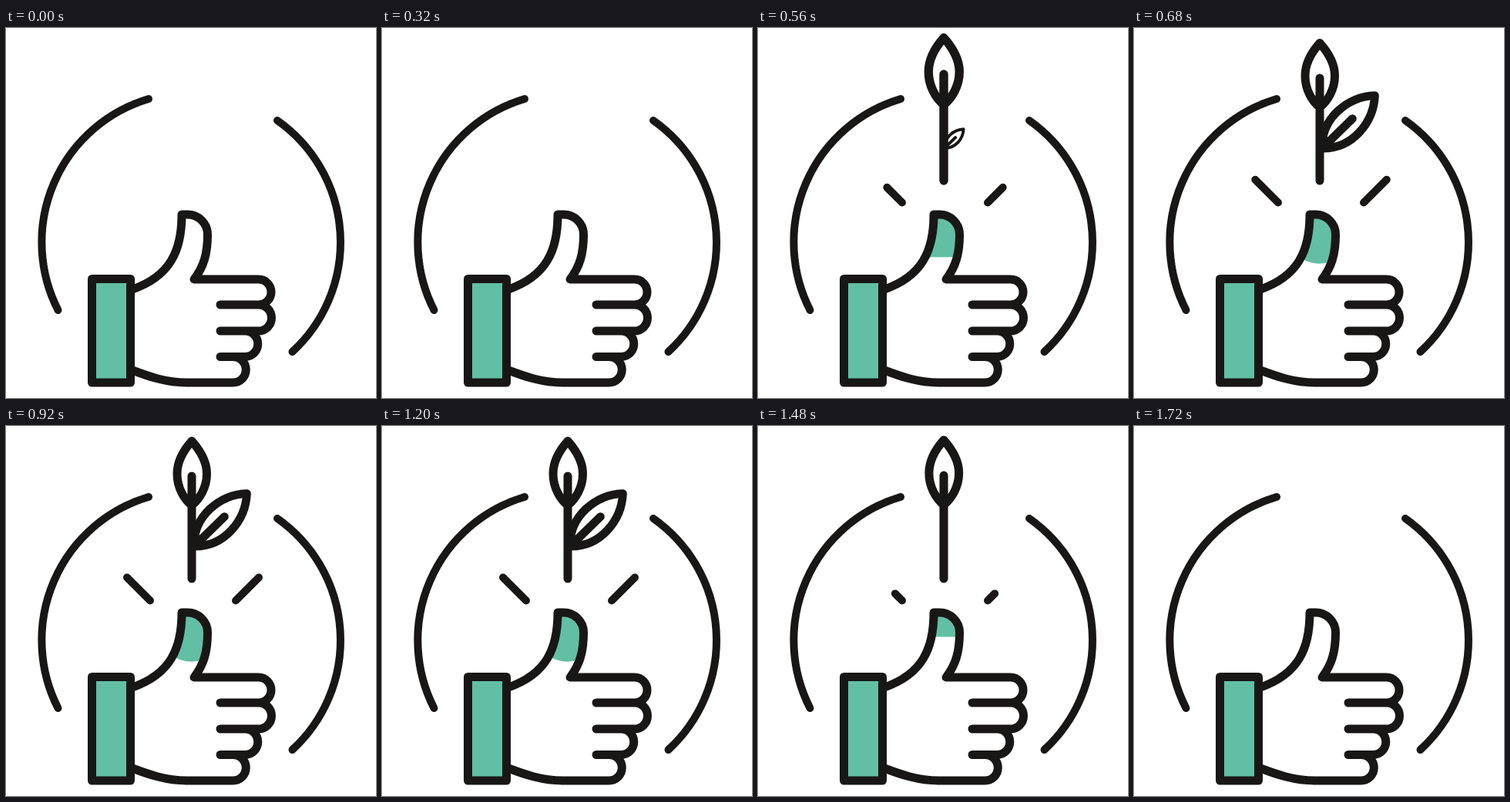
Write an HTML page that moves like this. It is 480 px wide and 480 px high and loops after 2 s.

```html
<!DOCTYPE html>
<html lang="en">
<head>
<meta charset="utf-8">
<title>Green thumb</title>
<style>
  html, body { margin: 0; width: 100%; height: 100%; overflow: hidden; background: #fff; }
  svg { display: block; width: 100%; height: 100%; }
  .ink { fill: none; stroke: #181716; stroke-width: 11; stroke-linecap: round; stroke-linejoin: round; }
  .thin { stroke-width: 10; }
  .green { fill: #62bfa4; }
</style>
</head>
<body>
<svg viewBox="0 0 480 480">
  <clipPath id="level"><rect id="levelBox" x="200" y="242" width="80" height="0"/></clipPath>

  <path class="ink thin" d="M185 92A194 194 0 0 0 67.500 366M352 120A193 193 0 0 1 371.500 420"/>

  <path class="green" clip-path="url(#level)"
    d="M228 242H235A26 26 0 0 1 261.500 268C261.500 285 260 296 256 303Q236 310 217 299C224 281 228 262 228 242Z"/>

  <g class="ink">
    <path class="green" d="M111.500 325.500H161.500V460H111.500Z"/>
    <path d="M164 339C213 322 228 289 228 242H235A26 26 0 0 1 261.500 268C261.500 292 257 309 244 326
      H327.500A16.500 16.500 0 0 1 327.500 359H278M327.500 359A17 17 0 0 1 327.500 393H278
      M310 393A16.500 16.500 0 0 1 310 426.500H278M294.500 426.500A16.700 16.700 0 0 1 294.500 460H234C208 460 185 452 164 444"/>
  </g>

  <path class="ink thin" id="rays"/>

  <g class="ink" id="plant">
    <path d="M241 198V65M241 19.500C229 33 222 48 222 62C222 80 231 95 241 103C251 95 260.500 80 260.500 62C260.500 48 253 33 241 19.500Z"/>
    <path id="leaf" d="M313.500 86.500C278 88 243 116 244 156C284 157 312 122 313.500 86.500ZM243 157L284 117"/>
  </g>
</svg>
<script>
  const LOOP = 2000, STEP = 40, MIDDLE = 980;

  const el = id => document.getElementById(id);
  const plant = el('plant'), leaf = el('leaf'), rays = el('rays'), levelBox = el('levelBox');

  const progress = (t, from, to) => Math.min(1, Math.max(0, (t - from) / (to - from)));
  const smooth = p => (1 - Math.cos(Math.PI * p)) / 2;
  const overshoot = (p, s = 1.22) => 1 + (s + 1) * (p - 1) ** 3 + s * (p - 1) ** 2;

  function scaleAbout(node, x, y, s) {
    node.setAttribute('visibility', s > 0.001 ? 'visible' : 'hidden');
    node.setAttribute('transform', `translate(${x} ${y}) scale(${s}) translate(${-x} ${-y})`);
  }

  function draw(time) {
    // The plant grows, then shrinks along the same path backwards.
    const t = MIDDLE - Math.abs(time - MIDDLE);
    scaleAbout(plant, 241, 198, overshoot(progress(t, 360, 620)));
    scaleAbout(leaf, 241, 158, 0.985 * smooth(progress(t, 480, 680)));

    const r = 30 * smooth(progress(t, 350, 700));
    rays.setAttribute('d', r > 0 ? `M187 226.500l${-r} ${-r}M298 226.500l${r} ${-r}` : '');
    levelBox.setAttribute('height', 66 * smooth(progress(t, 325, 645)));
  }

  const start = performance.now();
  function tick() {
    const time = (performance.now() - start) % LOOP;
    draw(Math.floor(time / STEP) * STEP);
    requestAnimationFrame(tick);
  }
  tick();
</script>
</body>
</html>
```
